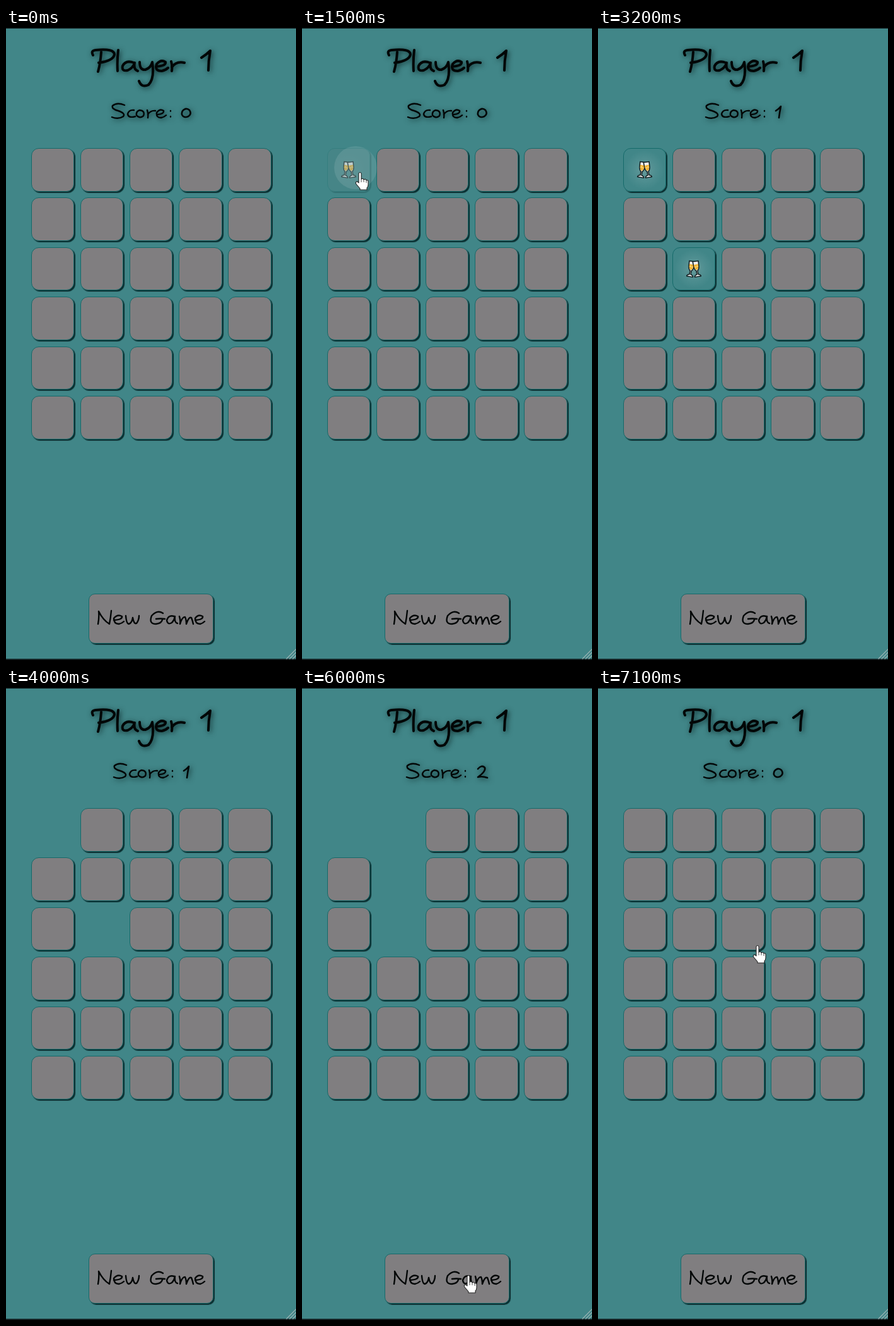
Animation, 460 px wide and 1000 px high, one loop 7.2 s. Source, as an HTML page:

```html
<!DOCTYPE html>
<html lang="en">
<head>
<meta charset="utf-8">
<title>Memory game</title>
<style>
  html, body { margin: 0; width: 100%; height: 100%; overflow: hidden; background: #418688; }
  #stage { position: relative; width: 460px; height: 1000px; overflow: hidden; background: #418688; }
  #stage > * { position: absolute; box-sizing: border-box; margin: 0; }
  .edge { left: 0; width: 460px; height: 2px; background: #142426; }
  svg { left: 0; top: 0; overflow: visible; pointer-events: none; }
  .ink path { fill: none; stroke: #020606; stroke-linecap: round; stroke-linejoin: round; }
  .soft { filter: drop-shadow(2px 2px 4px rgba(0, 20, 20, .75)); }

  /* live text lies under the hand-drawn lettering */
  .label { left: 0; width: 460px; text-align: center; color: transparent; font-family: Lato, sans-serif; font-weight: 400; }
  h1.label { top: 24px; font-size: 48px; line-height: 56px; }
  p.label { top: 115px; font-size: 28px; line-height: 34px; }
  button { left: 131px; top: 895px; width: 198px; height: 79px; padding: 0; color: transparent; font: 28px Lato, sans-serif; border-radius: 10px; }

  .face, button { border: 1.5px solid #146a6a; box-shadow: 2px 2px 1px #0a2e30; background: #807e80; }
  .card { width: 68.5px; height: 68.5px; }
  .face { position: absolute; inset: 0; border-radius: 12px; }
  .front { background: radial-gradient(circle, #669a9b 0, #4e8e90 38%, #418688 66%); }
  .card svg { position: absolute; left: 50%; top: 50%; }
  .tap { border-radius: 50%; background: #fff; }
</style>
</head>
<body>
<div id="stage">
  <div class="edge" style="top:-1px"></div>
  <div class="edge" style="top:998px"></div>
  <h1 class="label">Player 1</h1>
  <p class="label">Score: <span id="score">0</span></p>
  <button>New Game</button>

  <svg class="ink" width="460" height="1000" aria-hidden="true">
    <g class="soft" stroke-width="4">
      <path stroke-width="4" d="M138 43Q134 36 142 35Q172 32 172 42Q170 52 147 55M151 38Q150 55 146 69
        M178 35Q176 52 177 68M203 55Q190 50 185 60Q183 69 193 67Q202 63 204 55Q202 66 209 68
        M212 54Q212 67 221 66Q230 63 232 54Q236 80 226 90Q215 95 211 84
        M238 61Q254 60 253 54Q246 49 239 57Q235 68 247 68Q253 67 257 63
        M262 53Q264 60 263 68M263 62Q270 52 283 55M310 47Q318 42 324 36Q321 52 321 67"/>
    </g>
    <g class="soft">
      <path id="word" stroke-width="2.4" d="M188 122Q176 117 169 123Q167 128 178 131Q190 135 186 140Q178 145 168 141
        M203 130Q195 129 193 136Q194 143 205 140M212 130Q206 132 207 138Q212 144 218 139Q221 131 212 130
        M224 130Q226 136 225 142M225 137Q229 130 237 131
        M240 137Q251 136 250 131Q244 127 239 134Q238 142 246 142Q251 141 254 138M261 131v.5M261 140v.5"/>
      <path id="digit" stroke-width="2.6"/>
    </g>
    <path stroke-width="2.4" d="M146 943Q148 932 147 923Q154 937 164 943Q166 933 167 922
      M171 937Q185 936 184 931Q177 927 171 934Q171 943 179 943Q184 942 187 939
      M190 930Q191 943 195 943Q200 941 201 933Q203 944 207 942Q211 937 211 930
      M249 926Q240 920 231 930Q226 943 238 943Q247 942 248 936M238 935Q245 934 252 935
      M267 931Q258 928 255 937Q256 945 263 941Q267 937 268 931Q267 941 272 942
      M275 931Q277 937 276 943Q280 931 284 932Q286 936 286 943Q290 931 294 933Q296 938 297 943
      M300 937Q313 936 312 931Q305 927 300 934Q300 943 308 943Q312 942 315 939"/>
    <path style="stroke:#9db4b5;stroke-width:1.2" d="M445 998L460 983M450 998L460 988M455 998L460 993"/>
  </svg>

  <div class="tap" id="tap"></div>
  <svg id="cursor" width="1" height="1" fill="#fff" stroke="#222" stroke-width="1.1" stroke-linejoin="round">
    <g id="hand">
      <path d="M-2 1Q0 -2 2 1L2 10Q5 8 6 11Q9 9 10 12Q13 11 13 14L13 19Q13 22 11 24L11 27L0 27L0 25L-6 18Q-8 14 -4 14L-2 16Z"/>
      <path fill="none" stroke-width=".8" d="M2 10v5M6 11v4M10 12v4"/>
    </g>
    <path id="arrow" d="M0 0V22L5 17.5L9 26L12.5 24.5L9 16L15.5 15.5Z"/>
  </svg>
</div>

<script>
const LOOP = 7200, STEP = 100, RESET = 6600;
const $ = id => document.getElementById(id);
const clamp = v => Math.max(0, Math.min(1, v));

const flute = `<g transform="translate(-4.5 0) rotate(9)" stroke="#101c1e" stroke-width="1.5" stroke-linejoin="round">
  <path fill="#eee" d="M-4.5 -12H4.5L4 -3Q3 2 1 3V9Q5 10 5 12.5H-5Q-5 10 -1 9V3Q-3 2 -4 -3Z"/>
  <path fill="#f0b12f" stroke="none" d="M-3.7 -7H3.7L3.3 -3Q2 1.5 0 2Q-2 1.5 -3.3 -3Z"/>
  <path stroke="#fff5c4" stroke-width="1" d="M-1.5 -5v2M1 -4v2"/></g>`;
const toast = flute + `<g transform="scale(-1 1)">${flute}</g>`;
const wine = `<g stroke="#101416" stroke-width="1.7" stroke-linejoin="round">
  <path fill="#f4f4f4" d="M-6.5 -12.5H6.5L7 -5Q6 2 1.3 3V7.5Q6 8 6 10.5Q4 13 0 13T-6 10.5Q-6 8 -1.3 7.5V3Q-6 2 -7 -5Z"/>
  <path fill="#b3124a" stroke="none" d="M-5.7 -9.5H5.7L6 -5Q5 1.5 0 2T-6 -5Z"/>
  <path stroke="#f6a9c1" stroke-width="1.3" d="M-4 -10.5H4M-3 -7v3"/></g>`;

// cell: picture, opened at, removed at
const plays = {
  0: [toast, 1400, 3300], 11: [toast, 2200, 3300],
  1: [wine, 4200, 5700], 6: [wine, 4700, 5700]
};
const scores = [[0, 0], [2300, 1], [4800, 2], [RESET, 0]];
const digits = [
  [0, "M285 128Q278 130 279 137Q282 143 289 140Q295 136 291 130Q288 127 284 128"],
  [3, "M282 131Q287 128 290 124Q288 134 287 142"],
  [-2, "M279 128Q285 121 290 126Q292 132 279 141Q286 139 294 142"]
];
// time, x, y of the pointer tip
const track = [
  [[800, 460, 330], [1200, 92, 229], [1600, 92, 229], [2100, 153, 367], [2300, 153, 367]],
  [[4100, 160, 220], [4300, 160, 220], [4600, 158, 300], [4800, 158, 300], [5100, 233, 590],
   [5300, 250, 838], [5500, 264, 930], [6600, 264, 930], [7100, 253, 408], [7200, 253, 408]]
];
const taps = [[1400, 85, 221], [2200, 153, 368], [4200, 158, 218], [4700, 157, 298]];

const cards = Array.from({ length: 30 }, (_, i) => {
  const el = document.createElement("div"), play = plays[i];
  const x = 39.5 + 78.2 * (i % 5), y = 190 + 78.4 * Math.floor(i / 5);
  el.className = "card";
  el.style.cssText = `left:${x}px;top:${y}px`;
  el.innerHTML = (play ? `<div class="face front"></div><svg width="1" height="1">${play[0]}</svg>` : "")
    + '<div class="face back"></div>';
  $("stage").insertBefore(el, $("tap"));
  return { el, x, y, play, front: el.querySelector(".front"), icon: el.querySelector("svg"), back: el.querySelector(".back") };
});

function pointer(t) {
  const run = track.find(p => t >= p[0][0] && t < p[p.length - 1][0]);
  if (!run) return null;
  const i = run.findIndex(p => p[0] > t);
  const [t0, x0, y0] = run[i - 1], [t1, x1, y1] = run[i], k = (t - t0) / (t1 - t0);
  return [x0 + (x1 - x0) * k, y0 + (y1 - y0) * k];
}

function clickable(x, y, t) {
  const inside = (l, r, w, h) => x >= l && x < l + w && y >= r && y < r + h;
  if (inside(131, 895, 198, 80)) return true;
  const locked = (t >= 2300 && t < 3300) || (t >= 4800 && t < 5700);
  return !locked && cards.some(c => inside(c.x, c.y, 69, 69) &&
    !(c.play && t >= c.play[2] && t < RESET));
}

function drawCard({ el, play, front, icon, back }, t) {
  if (!play) return;
  const [, open, gone] = play, age = t - open, fresh = t >= RESET;
  el.style.opacity = fresh ? clamp((t - RESET + 100) / 300) : 1 - clamp((t - gone) / 300);
  back.style.opacity = fresh || age < 0 ? 1 : 1 - clamp(age / 110);
  front.style.opacity = fresh ? 0 : clamp(age / 600);
  icon.style.opacity = fresh ? 0 : clamp(.5 + age / 500) * (age >= 0);
}

function draw(t) {
  cards.forEach(c => drawCard(c, t));

  const score = scores.filter(s => s[0] <= t).pop()[1], [dx, d] = digits[score];
  $("score").textContent = score;
  $("word").setAttribute("transform", `translate(${dx} 0)`);
  $("digit").setAttribute("d", d);

  const tap = taps.find(p => t >= p[0] && t < p[0] + 400);
  $("tap").style.opacity = 0;
  if (tap) {
    const age = t - tap[0], r = 40 - age * .06;
    $("tap").style.cssText = `left:${tap[1] - r}px;top:${tap[2] - r}px;width:${2 * r}px;height:${2 * r}px;opacity:${.13 * (1 - age / 450)}`;
  }

  const pos = pointer(t);
  $("cursor").style.display = pos ? "" : "none";
  if (pos) {
    const hand = clickable(pos[0], pos[1], t);
    $("cursor").style.transform = `translate(${pos[0]}px, ${pos[1]}px)`;
    $("hand").style.display = hand ? "" : "none";
    $("arrow").style.display = hand ? "none" : "";
  }
}

// the picture advances ten times a second
const start = performance.now();
function tick() {
  const t = performance.now() - start + 25;
  draw(Math.floor(t / STEP) * STEP % LOOP);
  requestAnimationFrame(tick);
}
tick();
</script>
</body>
</html>
```
